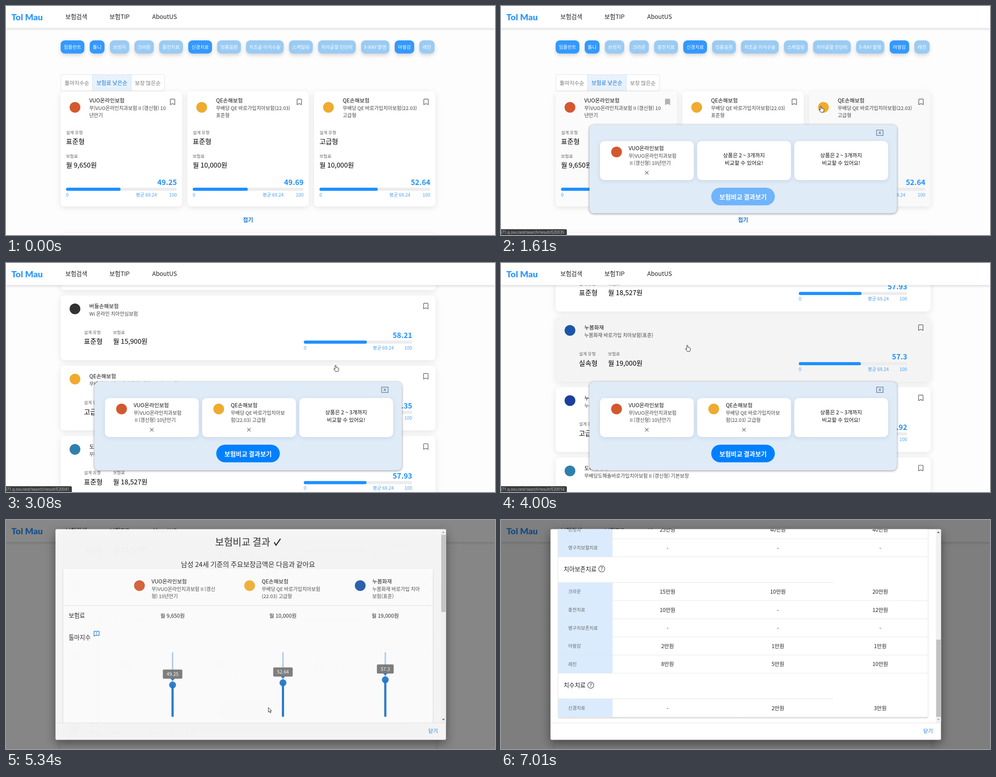
An HTML page with a canvas for the animation above (7280 ms loop, 1092 px wide and 513 px high).

```html
<!DOCTYPE html>
<html lang="ko">
<head>
<meta charset="utf-8">
<title>보험 비교</title>
<style>
html, body { margin: 0; width: 100%; height: 100%; overflow: hidden; background: #fdfdfd; }
canvas { display: block; width: 1092px; height: 513px; }
</style>
</head>
<body>
<canvas id="stage" width="1092" height="513"></canvas>
<script>
const W = 1092, H = 513, LOOP = 7280;
const ctx = document.getElementById('stage').getContext('2d');
const SANS = '"Noto Sans CJK KR", "Noto Sans KR", "Noto Sans CJK", "Noto Sans", sans-serif';
const BLUE = '#1e90ff', LINK = '#1976d2';

const BRANDS = {
  vuo: { name: 'VUO온라인보험', color: '#d4582f' },
  qe: { name: 'QE손해보험', color: '#efab30' },
  life: { name: '누봄생명', color: '#1d3f9c' },
  fire: { name: '누봄화재', color: '#1c56a8' },
  willow: { name: '버들손해보험', color: '#333333' },
  sol: { name: '도해솔생명', color: '#2f7fae' }
};
const CHIPS = [
  ['임플란트', 122, 53, 1], ['틀니', 187, 33, 1], ['브릿지', 232, 43], ['크라운', 287, 43],
  ['충전치료', 342, 53], ['신경치료', 407, 53, 1], ['잇몸질환', 471.5, 53], ['치조골 이식수술', 536, 84],
  ['스케일링', 632, 53], ['치아골절 진단비', 697, 84], ['X-RAY 촬영', 793, 63], ['아말감', 868, 43.5, 1], ['레진', 923, 34]
];
const GRID = [
  { brand: 'vuo', lines: ['무)VUO온라인치과보험 II (갱신형) 10', '년만기'], type: '표준형', price: '9,650', score: 49.25, hover: [870, 1390], pick: [1080, 290, 290] },
  { brand: 'qe', lines: ['무배당 QE 바로가입치아보험(22.03)', '표준형'], type: '표준형', price: '10,000', score: 49.69 },
  { brand: 'qe', lines: ['무배당 QE 바로가입치아보험(22.03)', '고급형'], type: '고급형', price: '10,000', score: 52.64, hover: [1520, 2480], pick: [1740, 726, 226] }
];
const LIST = [
  ['life', '누봄 온라인치과보험(2304) 실속형(오백만원 보장)', '고급형', '11,650', 56.67],
  ['willow', 'Wi 온라인 치아안심보험', '실속형', '12,400', 52.64],
  ['life', '누봄 온라인치과보험(2304) 표준형(오백만원 보장)', '표준형', '14,150', 60.18],
  ['willow', 'Wi 온라인 치아안심보험', '표준형', '15,900', 58.21],
  ['qe', '무배당 QE 바로가입치아보험(22.03) 든든형', '고급형', '17,200', 61.35],
  ['sol', '무배당도해솔바로가입치아보험 II (갱신형)', '표준형', '18,527', 57.93],
  ['fire', '누봄화재 바로가입 치아보험(표준)', '실속형', '19,000', 57.3],
  ['life', '누봄 온라인치과보험(2304) 고급형(천만원 보장)', '고급형', '19,850', 66.92],
  ['sol', '무배당도해솔바로가입치아보험 II (갱신형) 기본보장', '표준형', '20,300', 63.4]
].map(([brand, line, type, price, score]) => ({ brand, line, type, price, score }));
Object.assign(LIST[6], { hover: [3650, 4520], pick: [4255, 417, 185] });

const SLOTS = [
  { brand: 'vuo', at: 1210, lines: ['무)VUO온라인치과보험', ' II (갱신형) 10년만기'] },
  { brand: 'qe', at: 1870, lines: ['무배당 QE 바로가입치아보', '험(22.03) 고급형'] },
  { brand: 'fire', at: 4385, lines: ['누봄화재 바로가입 치아보험', '(표준)'] }
];
const COLS = [
  { brand: 'vuo', x: 325, mid: 372, lines: ['무)VUO온라인치과보험 II (갱신', '형) 10년만기'], price: '9,650', score: 49.25 },
  { brand: 'qe', x: 571, mid: 618.5, lines: ['무배당 QE 바로가입치아보험', '(22.03) 고급형'], price: '10,000', score: 52.64 },
  { brand: 'fire', x: 818, mid: 847, lines: ['누봄화재 바로가입 치아', '보험(표준)'], price: '19,000', score: 57.3 }
];
// Cover per product in units of 10,000 won; 0 means none.
const COVER = [
  ['치아보철치료', [['임플란트', 50, 80, 100], ['틀니', 50, 80, 100], ['브릿지', 25, 40, 40], ['영구치보철치료', 0, 0, 0]]],
  ['치아보존치료', [['크라운', 15, 10, 20], ['충전치료', 10, 0, 12], ['영구치보존치료', 0, 0, 0], ['아말감', 2, 1, 1], ['레진', 8, 5, 10]]],
  ['치수치료', [['신경치료', 0, 2, 3]]]
];

const PAGE_SCROLL = [[2180, 0], [2420, 364], [2750, 660], [3150, 960], [3500, 1225], [3720, 1332]];
const MODAL_SCROLL = [[5690, 0], [5950, 160], [6250, 390], [6560, 588]];
const CURSOR = [
  [800, 330, 456], [1000, 296, 300], [1150, 290, 290], [1600, 714, 224], [1740, 726, 226], [2100, 736, 229],
  [3150, 736, 229], [3740, 432, 188], [3980, 416, 184], [4280, 416, 184], [4600, 521, 298], [4900, 545, 423],
  [5150, 548, 424], [5330, 586, 420], [6480, 586, 420], [6900, 1080, 512]
];
const MODAL_AT = 5185;

const clamp = v => Math.max(0, Math.min(1, v));
const smooth = p => p * p * (3 - 2 * p);

// cubic-bezier(.4, 0, .2, 1)
function ease(x) {
  x = clamp(x);
  let lo = 0, hi = 1, u = x;
  for (let i = 0; i < 18; i++) {
    u = (lo + hi) / 2;
    if (1.2 * u * (1 - u) ** 2 + 0.6 * u * u * (1 - u) + u ** 3 < x) lo = u; else hi = u;
  }
  return 3 * u * u * (1 - u) + u ** 3;
}

function track(keys, t, curve = p => p) {
  const i = keys.findIndex(k => k[0] > t);
  if (i === 0) return keys[0].slice(1);
  if (i < 0) return keys[keys.length - 1].slice(1);
  const a = keys[i - 1], b = keys[i], p = curve((t - a[0]) / (b[0] - a[0]));
  return a.slice(1).map((v, j) => v + (b[j + 1] - v) * p);
}

// y is the optical middle of the line
function text(s, x, y, size, color = '#222', weight = 400, align = 'left', family = SANS) {
  ctx.font = `${weight} ${size}px ${family}`;
  ctx.textAlign = align;
  ctx.fillStyle = color;
  ctx.fillText(s, x, y + size * 0.37);
}

function box(x, y, w, h, r, fill, shadow) {
  ctx.save();
  if (shadow) [ctx.shadowColor, ctx.shadowBlur, ctx.shadowOffsetY] = shadow;
  ctx.beginPath();
  ctx.roundRect(x, y, w, h, r);
  ctx.fillStyle = fill;
  ctx.fill();
  ctx.restore();
}

function line(points, color, width = 1) {
  ctx.beginPath();
  points.forEach(([x, y]) => ctx.lineTo(x, y));
  ctx.strokeStyle = color;
  ctx.lineWidth = width;
  ctx.stroke();
}

function disc(x, y, r, fill) {
  ctx.beginPath();
  ctx.arc(x, y, r, 0, 7);
  ctx.fillStyle = fill;
  ctx.fill();
}

function cross(x, y, r, color, width = 1) {
  line([[x - r, y - r], [x + r, y + r]], color, width);
  line([[x - r, y + r], [x + r, y - r]], color, width);
}

function clipTo(x, y, w, h, r = 0) {
  ctx.beginPath();
  ctx.roundRect(x, y, w, h, r);
  ctx.clip();
}

const logo = (brand, x, y) => disc(x, y, 12, BRANDS[brand].color);

function product(p, x, y, lines = p.lines) {
  text(BRANDS[p.brand].name, x, y, 11.9, '#111', 500);
  lines.forEach((s, i) => text(s, x, y + 17.3 + i * 16.3, 11, '#444'));
}

function bookmark(x, y, filled, faded) {
  ctx.beginPath();
  [[-5, 6.4], [-5, -5], [-4, -6], [4, -6], [5, -5], [5, 6.4], [0, 4.2]].forEach(([dx, dy]) => ctx.lineTo(x + dx, y + dy));
  ctx.closePath();
  ctx.fillStyle = ctx.strokeStyle = filled || faded ? '#b2b2b2' : '#666';
  ctx.lineWidth = 1.4;
  ctx.lineJoin = 'round';
  if (filled) ctx.fill();
  ctx.stroke();
}

function meter(x, right, y, score) {
  const w = right - x;
  text(score, right, y - 15, 16.2, BLUE, 700, 'right');
  box(x, y - 3.5, w, 7, 3.5, '#ededed');
  box(x, y - 3.5, w * score / 100, 7, 3.5, BLUE);
  const axis = (s, ax, align) => text(s, ax, y + 12.5, 10.3, '#4a9ff0', 400, align);
  axis('0', x, 'left');
  axis('평균 69.24', right - (w > 245 ? 44.5 : 41), 'right');
  axis('100', right, 'right');
}

// Hover tint and press ripple; sy is the scroll at the time of the press.
function feedback(card, x, y, w, h, t, sy) {
  ctx.save();
  clipTo(x, y, w, h, 8);
  if (card.hover) {
    const k = ease((t - card.hover[0]) / 250) - ease((t - card.hover[1]) / 250);
    ctx.fillStyle = `rgba(0,0,0,${0.042 * k})`;
    ctx.fillRect(x, y, w, h);
  }
  if (card.pick && t > card.pick[0]) {
    const [at, px, py] = card.pick, cy = py + sy;
    const grow = ease((t - at) / 550);
    const alpha = (0.1 + 0.2 * grow) * (1 - ease((t - at - 130) / 550));
    const full = Math.hypot(Math.max(px - x, x + w - px), Math.max(cy - y, y + h - cy));
    if (alpha > 0) disc(px, cy, full * grow, `rgba(0,0,0,${alpha})`);
  }
  ctx.restore();
}

const CARD_SHADOW = ['rgba(0,0,0,.1)', 14, 3];
const picked = (card, t) => card.pick && t >= card.pick[0] + 130;

function gridCard(card, i, t) {
  const x = 122 + i * 283, y = 191;
  box(x, y, 271, 258, 8, '#fff', CARD_SHADOW);
  feedback(card, x, y, 271, 258, t, 0);
  logo(card.brand, x + 32, 227);
  product(card, x + 64, 211.5);
  bookmark(x + 250, 214.5, picked(card, t), t > SLOTS[2].at);
  text('설계 유형', x + 12, 283, 9.6, '#666');
  text(card.type, x + 12, 303.5, 15.1, '#000', 500);
  text('보험료', x + 12, 336, 9.6, '#666');
  text(`월 ${card.price}원`, x + 12, 356.5, 15.1, '#000', 500);
  meter(x + 12, x + 259.5, 410.5, card.score);
}

function listCard(card, i, t) {
  const x = 122, y = 509 + i * 157.33;
  box(x, y, 837.5, 145, 8, '#fff', CARD_SHADOW);
  feedback(card, x, y, 837.5, 145, t, 1332);
  logo(card.brand, 154, y + 30);
  product(card, 186, y + 24, [card.line]);
  bookmark(937.5, y + 23.5, picked(card, t), t > SLOTS[2].at);
  text('설계 유형', 174, y + 82.5, 9.6, '#666');
  text(card.type, 174, y + 103, 15.1, '#000', 500);
  text('보험료', 239, y + 82.5, 9.6, '#666');
  text(`월 ${card.price}원`, 239, y + 103, 15.1, '#000', 500);
  meter(665, 907, y + 104.5, card.score);
}

function page(t) {
  const [scroll] = track(PAGE_SCROLL, t);
  ctx.save();
  ctx.translate(0, -scroll);
  for (const [label, x, w, on] of CHIPS) {
    box(x, 77, w, 29.5, 9, on ? '#3399ff' : '#9acbf3', ['rgba(0,0,0,.16)', 8, 4]);
    text(label, x + w / 2, 92, 10.5, '#fff', 500, 'center');
  }
  box(122, 153, 232.5, 38, 4, '#dfe3e8');
  box(123, 154, 230.5, 36, 3, '#fff');
  ctx.fillStyle = '#e8f2fc';
  ctx.fillRect(194, 154, 85.5, 36);
  line([[193.5, 153], [193.5, 190]], '#cfdeec');
  line([[279.5, 153], [279.5, 190]], '#cfdeec');
  text('톨마지수순', 131, 172.5, 11.9, '#777');
  text('보험료 낮은순', 202, 172.5, 12, LINK, 500);
  text('보장 많은순', 288, 172.5, 11.9, '#777');
  GRID.forEach((c, i) => gridCard(c, i, t));
  text('접기', 540.5, 479, 12.3, LINK, 700, 'center');
  LIST.forEach((c, i) => listCard(c, i, t));
  ctx.restore();
}

function header() {
  box(0, 0, W, 49.5, 0, '#fff', ['rgba(0,0,0,.18)', 6, 1]);
  text('Tol Mau', 12, 25, 19.5, '#3399ff', 900, 'left', 'Lato, sans-serif');
  text('보험검색', 132.5, 24, 13.3, '#222');
  text('보험TIP', 231, 24, 13.4, '#222');
  text('AboutUS', 326.5, 24, 13.4, '#222');
}

function popup(t) {
  const rise = ease((t - SLOTS[0].at) / 225);
  if (rise <= 0) return;
  ctx.save();
  ctx.translate(t > MODAL_AT ? 6 : 0, (1 - rise) * 260);
  box(197.5, 266, 686.5, 198.5, 10, '#dfebf7', ['rgba(0,0,0,.45)', 5, 1]);
  ctx.strokeStyle = '#6d86a0';
  ctx.lineWidth = 1.5;
  ctx.strokeRect(838.7, 278, 14.6, 12);
  cross(846, 284, 2.4, '#6d86a0', 1.4);
  SLOTS.forEach((s, i) => {
    const x = 221 + i * 217, mid = x + 104.5;
    box(x, 302.5, 209.5, 87.5, 10, '#fff', ['rgba(60,90,130,.14)', 10, 2]);
    if (t >= s.at) {
      logo(s.brand, x + 37, 327);
      product(s, x + 64, 318.5);
      cross(mid, 373.5, 3.8, '#555', 1.1);
    } else {
      text('상품은 2 ~ 3개까지', mid, 335, 11.9, '#111', 500, 'center');
      text('비교할 수 있어요!', mid, 352, 11.9, '#111', 500, 'center');
    }
  });
  box(469.5, 407, 142, 39.5, 20, t >= SLOTS[1].at ? '#0080ff' : '#70b4fb');
  text('보험비교 결과보기', 540.5, 427.5, 13.9, '#fff', 700, 'center');
  ctx.restore();
}

function status(t) {
  if (t < 1000 || t > 4700) return;
  const code = t < 2000 ? 35 : t < 3720 ? 41 : 14;
  box(-4, 500, 151, 16, 3, '#3b3c3e');
  text(`b471.q.ovu.test/search/result/E200${code}`, 141.5, 507, 8.6, '#c8c8c8', 400, 'right', '"Open Sans", sans-serif');
}

function slider(c) {
  const y = 441 - 1.45 * c.score;
  box(c.mid - 1.5, 296, 3, 145, 1.5, '#a6c6e7');
  box(c.mid - 2.5, y, 5, 441 - y, 2, '#2476c9');
  disc(c.mid, y, 7.7, '#2476c9');
  const w = String(c.score).length > 4 ? 43.5 : 37.5;
  box(c.mid - w / 2, y - 34.5, w, 20.5, 2.5, '#757575');
  ctx.beginPath();
  [[-5, -14.5], [5, -14.5], [0, -9.5]].forEach(([dx, dy]) => ctx.lineTo(c.mid + dx, y + dy));
  ctx.fill();
  text(c.score, c.mid, y - 24.3, 10.6, '#fff', 500, 'center');
}

function helpIcon(x, y) {
  ctx.beginPath();
  ctx.arc(x, y, 6.8, 0, 7);
  ctx.strokeStyle = '#666';
  ctx.lineWidth = 1.4;
  ctx.stroke();
  text('?', x, y, 10.5, '#666', 700, 'center');
}

function coverTable() {
  let y = 450.7;
  const rowH = 40.6;
  for (const [title, rows] of COVER) {
    text(title, 140, y + 27, 13.3, '#222', 500);
    helpIcon(140 + ctx.measureText(title).width + 11.5, y + 27);
    y += 57.5;
    line([[128, y], [742, y]], '#e0e0e0');
    for (const [label, ...sums] of rows) {
      ctx.fillStyle = '#daebfd';
      ctx.fillRect(128, y, 121, rowH);
      text(label, 150, y + 20.5, 10.3, '#666');
      sums.forEach((v, i) => text(v ? v + '만원' : '-', COLS[i].mid, y + 20.5, 11.9, '#222', 400, 'center'));
      y += rowH;
      line([[128, y], [953, y]], '#e3e6e9');
    }
  }
}

function modalBody() {
  text('보험비교 결과', 467, 49.5, 21.4, '#222', 500);
  line([[599, 50], [603, 56.5], [613, 42]], '#222', 2.4);
  text('남성 24세 기준의 주요보장금액은 다음과 같아요', 540.5, 99.5, 15.2, '#222', 400, 'center');
  box(127.5, 109.5, 826, 921, 4, '#fff', ['rgba(0,0,0,.3)', 2, 1]);
  for (const c of COLS) {
    logo(c.brand, c.x - 27, 147);
    product(c, c.x, 137.5);
    text(`월 ${c.price}원`, c.mid, 214.5, 11.9, '#222', 400, 'center');
    slider(c);
  }
  line([[128, 191.5], [953, 191.5]], '#e0e0e0');
  text('보험료', 140, 214, 13.2, '#222', 500);
  text('톨마지수', 140, 263, 13.3, '#222', 500);
  line([[196.5, 260.5], [196.5, 249.5], [208, 249.5], [208, 258.5], [198.5, 258.5], [196.5, 260.5]], LINK, 1.3);
  line([[202.2, 251.3], [202.2, 254.5]], LINK, 1.3);
  line([[202.2, 255.6], [202.2, 256.9]], LINK, 1.3);
  coverTable();
}

function arrowhead(y, dir, color) {
  ctx.beginPath();
  [[-3, 1.5], [3, 1.5], [0, -1.8]].forEach(([dx, dy]) => ctx.lineTo(976.8 + dx, y + dy * dir));
  ctx.fillStyle = color;
  ctx.fill();
}

function modal(t) {
  const a = ease((t - MODAL_AT) / 225);
  if (a <= 0) return;
  const [scroll] = track(MODAL_SCROLL, t);
  ctx.save();
  ctx.globalAlpha = a;
  ctx.fillStyle = 'rgba(0,0,0,.5)';
  ctx.fillRect(0, 0, W, H);
  box(110.5, 20.5, 872, 472, 3, '#fff', ['rgba(0,0,0,.45)', 22, 8]);
  ctx.save();
  clipTo(110.5, 20.5, 861, 433.5);
  ctx.translate(0, -scroll);
  modalBody();
  ctx.restore();
  ctx.fillStyle = '#f1f1f1';
  ctx.fillRect(971, 21, 11.5, 433);
  ctx.fillStyle = '#c1c1c1';
  ctx.fillRect(972, 33 + scroll * 235 / 588, 10, 173);
  arrowhead(27.5, 1, scroll > 0 ? '#505050' : '#a3a3a3');
  arrowhead(447, -1, scroll < 588 ? '#505050' : '#a3a3a3');
  line([[110.5, 454.5], [982.5, 454.5]], '#e0e0e0');
  text('닫기', 943, 472.5, 11.6, LINK);
  ctx.restore();
}

const ARROW = [[0, 0], [0, 10.5], [2.4, 8.3], [4, 12], [5.6, 11.3], [4.1, 7.7], [7.2, 7.5]];
const HAND = [[-1.2, 1], [0, 0], [1.2, 1], [1.4, 5], [6, 6.2], [7.2, 7.5], [6.8, 11], [5.6, 14], [0, 14], [-4, 8.6], [-3.4, 7.6], [-1.2, 9]];

function cursor(t) {
  if (t < 800 || t > 6900) return;
  const [x, y] = track(CURSOR, t, smooth);
  const hand = (t > 870 && t < 4500) || (t > 4850 && t < 5200);
  ctx.beginPath();
  (hand ? HAND : ARROW).forEach(([dx, dy]) => ctx.lineTo(x + dx, y + dy));
  ctx.closePath();
  ctx.fillStyle = '#fff';
  ctx.strokeStyle = '#222';
  ctx.lineWidth = 1;
  ctx.lineJoin = 'round';
  ctx.fill();
  ctx.stroke();
}

function draw(now) {
  const t = now % LOOP;
  ctx.fillStyle = '#fdfdfd';
  ctx.fillRect(0, 0, W, H);
  page(t);
  header();
  popup(t);
  status(t);
  modal(t);
  cursor(t);
}

const start = performance.now();
(function frame() {
  draw(performance.now() - start);
  requestAnimationFrame(frame);
})();
</script>
</body>
</html>
```
